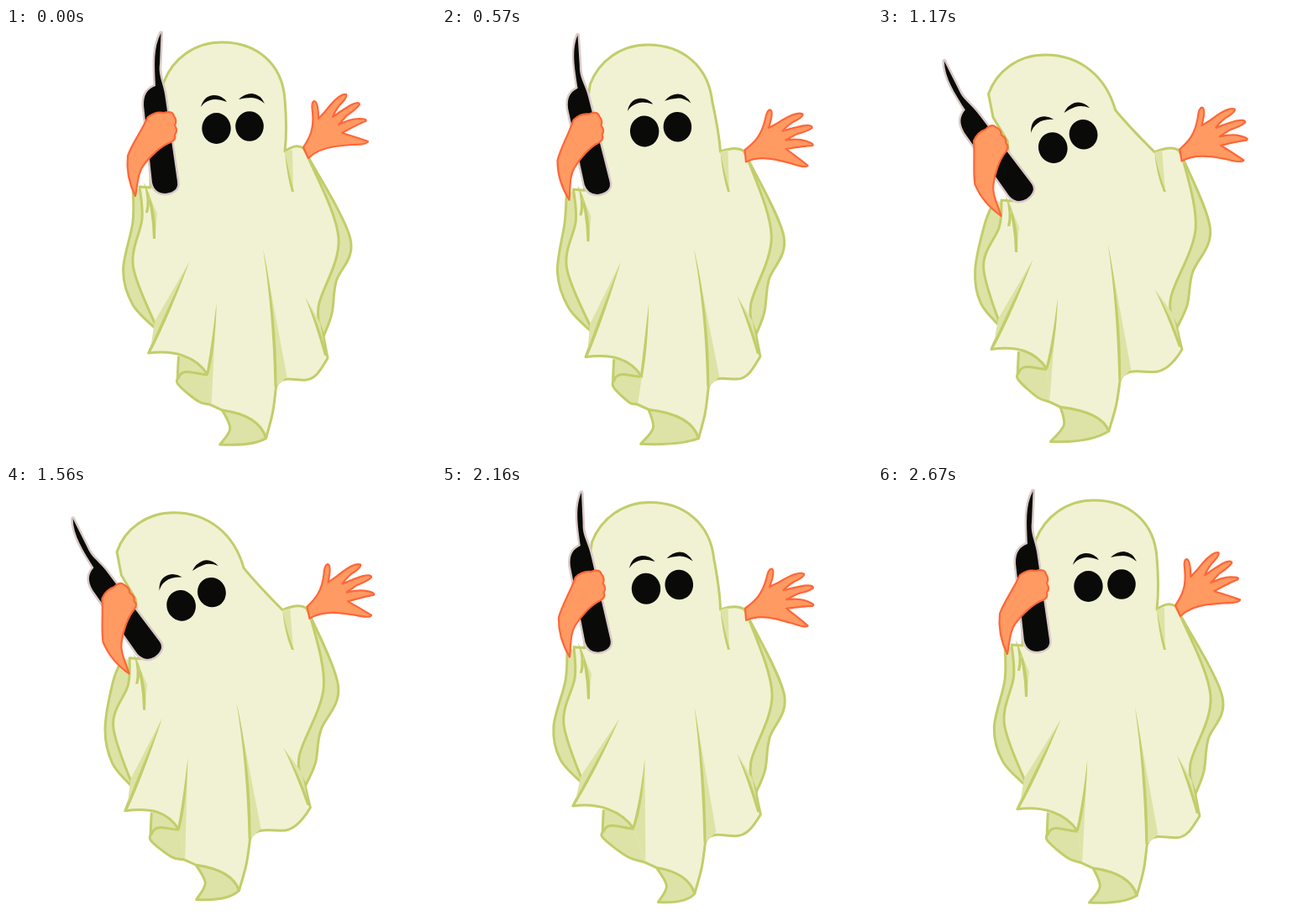
These frames come from a looping animation (512 by 512 pixels, 2700 ms). An HTML page with a canvas:

```html
<!DOCTYPE html>
<html lang="en">
<head>
<meta charset="utf-8">
<title>Ghost on the phone</title>
<style>
html, body { margin: 0; width: 100%; height: 100%; overflow: hidden; background: #fff; }
canvas { display: block; }
</style>
</head>
<body>
<canvas id="stage" width="512" height="512"></canvas>
<script>
const ctx = document.getElementById('stage').getContext('2d');
const LIGHT = '#f1f2d3', SHADE = '#dde3a6', LINE = '#c2cd6a';
const BLACK = '#0a0b08', SKIN = '#ff9a62', SKIN_LINE = '#ff6638';
const LOOP = 2700, STEP = 30;

const phone = new Path2D('M184.5 6C175 24 177 45 178 69C168 73 164 79 164 92L174 184Q177 197 190 197Q206 195 204 183L190 85C188 66 181 58 183 43Z');
const phoneHand = new Path2D('M169 106Q178 99 188 101Q199 98 200 105Q204 110 201 116Q205 122 201 127Q203 133 196 136C185 140 172 152 164 163C157 172 157 185 154 200C148 188 143 170 145 152C150 138 160 125 169 106Z');
const wavingHand = new Path2D('M354 142C362 130 367 120 365 100Q363 88 367 87Q372 88 372 108Q380 100 386 92Q398 78 405 79Q407 82 397 92Q391 100 389 106Q400 98 410 92Q420 87 421 91Q418 96 406 104L396 115Q410 108 420 108Q431 108 428 111Q420 114 400 125Q420 131 431 135Q430 139 412 139Q400 140 392 141C378 143 368 147 360 155Z');
const brows = new Path2D('M232 94Q236 80 248 80Q257 80 263 88Q250 83 243 86Q236 88 232 94ZM277 85Q284 78 293 78Q303 79 308 90Q300 83 292 83Q284 83 277 85Z');

const clamp = v => Math.min(1, Math.max(0, v));
const ease = k => (1 - Math.cos(Math.PI * clamp(k))) / 2;
const cycle = (t, period, peak) => Math.cos(2 * Math.PI * (t / period - peak));
const mix = (a, b, k) => a.map((v, i) => v + (b[i] - v) * k);
const shift = (p, x, y) => [p[0] + x, p[1] + y];

// Smooth curve through points, joined to the current path
function spline(path, ...pts) {
  path.lineTo(...pts[0]);
  for (let i = 0; i < pts.length - 1; i++) {
    const a = pts[i - 1] || pts[i], b = pts[i], c = pts[i + 1], d = pts[i + 2] || c;
    path.bezierCurveTo(b[0] + (c[0] - a[0]) / 6, b[1] + (c[1] - a[1]) / 6,
      c[0] - (d[0] - b[0]) / 6, c[1] - (d[1] - b[1]) / 6, ...c);
  }
}

function paint(path, fill, stroke, width = 3) {
  if (fill) { ctx.fillStyle = fill; ctx.fill(path); }
  if (stroke) { ctx.strokeStyle = stroke; ctx.lineWidth = width; ctx.stroke(path); }
}

// Cloth behind the front: outlined along the curve, filled in to a hidden point
function sheet(inner, ...pts) {
  const path = new Path2D();
  spline(path, ...pts);
  const area = new Path2D(path);
  area.lineTo(...inner);
  paint(area, SHADE);
  paint(path, null, LINE);
}

// Shaded wedge beside a line that thickens downwards
function fold(top, bend, foot, side, width = 5) {
  const wedge = new Path2D();
  wedge.moveTo(...top);
  wedge.quadraticCurveTo(...bend, ...foot);
  wedge.lineTo(...side);
  paint(wedge, SHADE);
  const blade = new Path2D();
  blade.moveTo(...top);
  blade.quadraticCurveTo(...bend, ...shift(foot, 1, 0));
  blade.lineTo(...shift(foot, -2, 0));
  blade.quadraticCurveTo(...shift(bend, -width, 0), ...top);
  paint(blade, LINE);
}

function turned(angle, x, y, draw) {
  ctx.save();
  ctx.translate(x, y);
  ctx.rotate(angle * Math.PI / 180);
  ctx.translate(-x, -y);
  draw();
  ctx.restore();
}

function drawBody(t, tilt, wave) {
  const flutter = cycle(t, 450, 0.22), swing = cycle(t, 675, 0.2);

  // The middle leans furthest; the left hem flutters and the tail swings
  const lean = (x, y) => [x + tilt * ((x - 260) ** 2 / 1150 - 34), y + tilt * (180 - x) / 20];
  const cloth = (x, y) => {
    const reach = clamp((y - 250) / 130) * Math.max(0, 390 - x) / 25 * flutter;
    return shift(lean(x, y), reach, reach * 0.65);
  };
  const tail = (x, y, reach) => shift(lean(x, y), reach * swing, 0);
  const head = (x, y) => {
    const bend = tilt * Math.sin(Math.PI / 2 * clamp((150 - y) / 100));
    return [x - 58 * bend, y + 15 * bend];
  };
  const arm = (x, y) => [x - 12 * tilt, y + 16 * tilt];

  const heart = cloth(260, 240);
  const notch = cloth(180, 360), left = cloth(168, 386), innerL = cloth(151, 284);
  const flap = cloth(239, 412), curl = cloth(204, 391), under = cloth(204, 424);
  const tailTop = tail(256, 455, 5), tailIn = tail(264, 477, 9), tailL = tail(251, 496, 12);
  const tailR = cloth(309, 488), cut = cloth(321, 427), hem = cloth(355, 419);
  const corner = cloth(383, 393), side = cloth(378, 367);
  const innerR = cloth(396, 250), innerLow = cloth(372, 331);
  const wrist = [354 + 6 * wave, 143 + 4 * wave], wristLow = shift(wrist, 5, 9);
  const armIn = arm(159, 189);
  const underEnd = shift(tailTop, -13, -6);

  sheet(heart, arm(151, 189), cloth(151, 231), cloth(139, 288), cloth(150, 329), notch);
  sheet(heart, wristLow, cloth(410, 251), cloth(393, 302), cloth(388, 340), side);
  sheet(shift(flap, -4, -40), curl, shift(under, -1, -10), under,
    shift(mix(under, tailTop, 0.45), 0, 6), underEnd, tailTop);

  const roll = new Path2D();
  roll.moveTo(...flap);
  roll.bezierCurveTo(...shift(flap, -14, 0), ...shift(under, 4, -22), ...shift(under, 0, -8));
  paint(roll, null, LINE);

  const tailBack = new Path2D();
  spline(tailBack, tailTop, tailIn, tailL);
  tailBack.quadraticCurveTo((tailL[0] + tailR[0]) / 2 + 12, Math.max(tailL[1], tailR[1]) + 2, ...tailR);
  tailBack.quadraticCurveTo(tailR[0] - 8, tailTop[1] + 6, ...tailTop);
  paint(tailBack, SHADE, LINE);

  const front = new Path2D();
  front.moveTo(...underEnd);
  front.lineTo(...tailTop);
  front.quadraticCurveTo(tailR[0] - 8, tailTop[1] + 6, ...tailR);
  spline(front, tailR, shift(mix(tailR, cut, 0.5), 2, 0), cut);
  front.bezierCurveTo(...shift(cut, 6, -14), ...shift(hem, -16, 0), ...hem);
  front.bezierCurveTo(...shift(hem, 13, 0), ...shift(corner, -9, 15), ...corner);
  spline(front, corner, side, innerLow, innerR, wristLow);
  front.lineTo(...wrist);
  front.quadraticCurveTo(...shift(wrist, -9, -6), ...head(332, 147));
  front.bezierCurveTo(...head(334, 130), ...head(334, 108), ...head(332, 85));
  front.bezierCurveTo(...head(329, 42), ...head(298, 17), ...head(257, 17));
  front.bezierCurveTo(...head(225, 17), ...head(199, 36), ...head(188, 64));
  front.lineTo(...head(181, 95));
  front.lineTo(...head(172, 130));
  front.lineTo(...arm(172, 190));
  spline(front, armIn, shift(mix(armIn, innerL, 0.4), 6, 0), innerL, notch);
  front.lineTo(...left);
  front.bezierCurveTo(...shift(left, 30, -4), ...shift(flap, -14, -22), ...flap);
  paint(front, LIGHT, LINE);

  const topLeft = cloth(218, 278), topMid = cloth(250, 327);
  const topRight = cloth(306, 263), topEdge = cloth(356, 320);
  fold(topLeft, shift(mix(topLeft, left, 0.55), 3, 4), shift(left, 2, -2), mix(notch, innerL, 0.15), 6);
  fold(topMid, shift(topMid, -1, 52), flap, underEnd);
  fold(topRight, [cut[0] + 1, topRight[1] + 75], cut, shift(cut, 13, -12));
  fold(topEdge, shift(mix(topEdge, corner, 0.5), 4, -4), shift(corner, -2, -3), shift(side, -4, -16));

  // Creases at both arms
  const joint = head(332, 147);
  fold(joint, shift(joint, 5, 26), [342, 195], shift(joint, 9, -2), 3);
  const crease = arm(164, 184), tip = arm(177, 251);
  fold(crease, shift(tip, 3, -38), tip, shift(tip, 3, -30), 6);
  fold(crease, shift(tip, -3, -46), shift(tip, -9, -31), shift(tip, -6, -48), 4);
}

function draw(t) {
  const tilt = ease((t - 300) / 900) - ease((t - 1500) / 900);
  const wave = (1 - cycle(t, 900, 0)) / 2;
  ctx.clearRect(0, 0, 512, 512);
  ctx.lineJoin = ctx.lineCap = 'round';
  drawBody(t, tilt, wave);
  turned(23 * wave, 348, 163, () => paint(wavingHand, SKIN, SKIN_LINE, 2.2));
  turned(-20 * tilt, 295, 251, () => {
    const eyes = new Path2D();
    eyes.ellipse(250.5, 119.5, 17.2, 18.5, 0, 0, 7);
    eyes.closePath();
    eyes.moveTo(306.8, 117);
    eyes.ellipse(290, 117, 16.8, 17.8, 0, 0, 7);
    paint(eyes, BLACK);
    paint(brows, BLACK);
  });
  turned(-29.2 * tilt, 196, 226, () => {
    paint(phone, null, '#d9cac8', 5);
    paint(phone, BLACK);
    paint(phoneHand, SKIN, SKIN_LINE, 2.2);
  });
}

function tick() {
  draw(Math.floor(performance.now() % LOOP / STEP) * STEP);
  requestAnimationFrame(tick);
}
tick();
</script>
</body>
</html>
```
